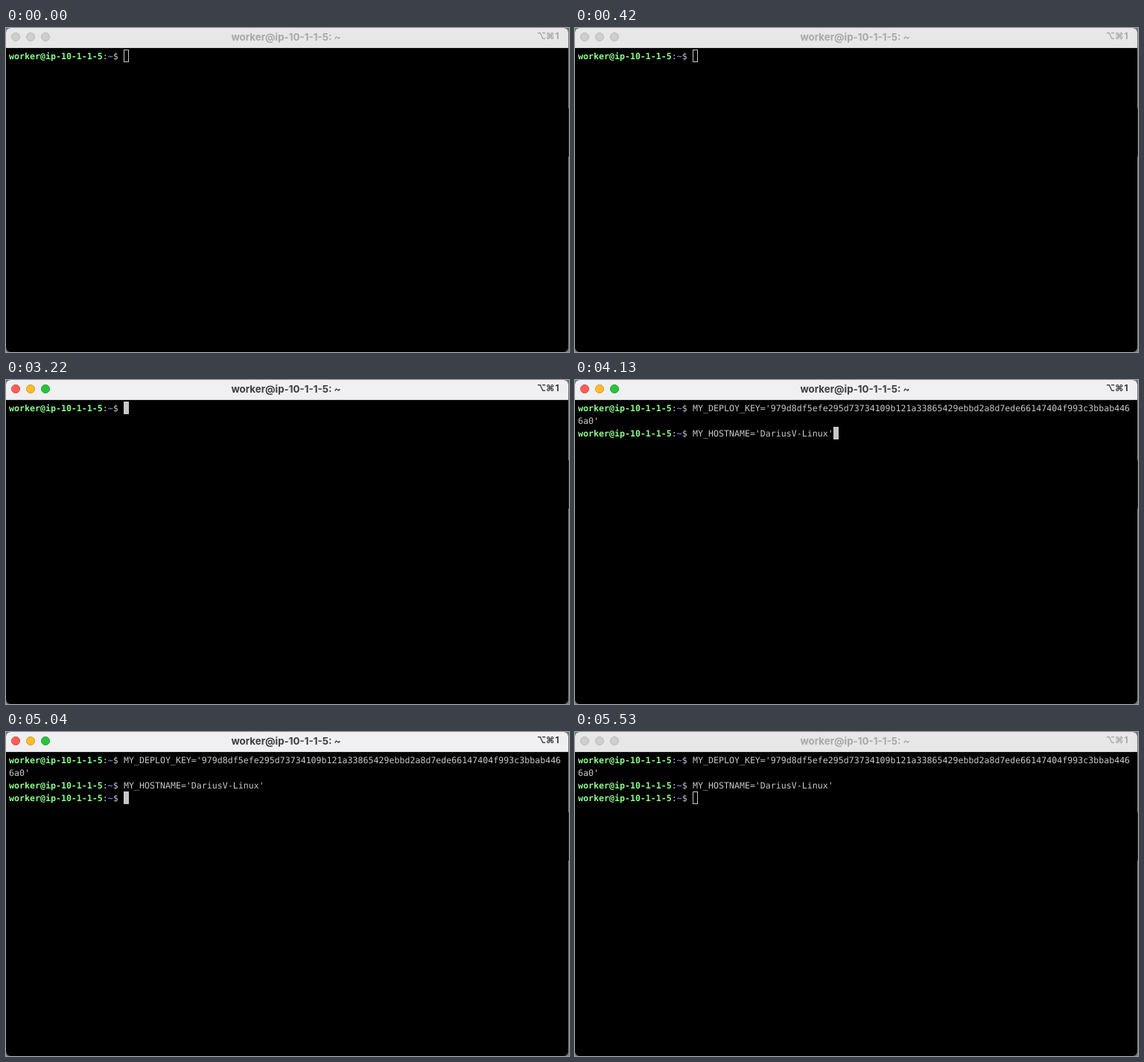
These frames come from a looping animation (756 by 436 pixels, 8 s). An HTML page:

```html
<!DOCTYPE html>
<html lang="en">
<head>
<meta charset="utf-8">
<title>Terminal</title>
<style>
  html, body { margin: 0; width: 100%; height: 100%; overflow: hidden; background: #000; }
  svg { display: block; width: 100%; height: 100%; }

  .bar, .heading, .lit, .cursor, .typed, .next { animation: 8s step-end infinite; }

  .bar { fill: #e7e7e7; animation-name: bar; }
  .heading { fill: #a8a8a8; font: 700 13.3px Inter, sans-serif; animation-name: heading; }
  .off { fill: #cecece; stroke: #b9b9b9; }
  .lit { animation-name: lit; }

  .screen {
    font: 11.628px "DejaVu Sans Mono", monospace;
    text-rendering: geometricPrecision;
    fill: #c7c7c7;
  }
  .user { fill: #8dff8a; font-weight: 700; }
  .path { fill: #7a72e8; font-weight: 700; }
  .typed { animation-name: typed; }
  .next { animation-name: next; }
  .cursor { stroke: #c7c7c7; animation-name: blink, move; }

  /* The window has focus from 3150 to 5530 ms. */
  @keyframes bar { 0%, 69.125% { fill: #e7e7e7 } 39.375% { fill: #f0f0f2 } }
  @keyframes heading { 0%, 69.125% { fill: #a8a8a8 } 39.375% { fill: #3d3d3f } }
  @keyframes lit { 0%, 69.125% { opacity: 0 } 39.375% { opacity: 1 } }
  @keyframes blink { 0%, 69.125% { fill: #000 } 39.375% { fill: #c7c7c7 } }

  /* Pasted at 4130 ms, return at 4970 ms, new prompt at 5040 ms. */
  @keyframes typed { 0% { opacity: 0 } 51.625%, 100% { opacity: 1 } }
  @keyframes next { 0% { opacity: 0 } 63%, 100% { opacity: 1 } }
  @keyframes move {
    0% { transform: translate(158px, 29px) }
    51.625% { transform: translate(347px, 63px) }
    62.125% { transform: translate(4px, 80px) }
    63%, 100% { transform: translate(158px, 80px) }
  }
</style>
</head>
<body>
<svg viewBox="0 0 756 436">
  <defs>
    <clipPath id="frame"><rect width="755" height="436" rx="6"/></clipPath>
    <text id="prompt" x="4" y="42"><tspan class="user">worker@ip-10-1-1-5</tspan>:<tspan class="path">~</tspan>$</text>
    <g id="lights">
      <circle cx="13" cy="12" r="5.5"/>
      <circle cx="33" cy="12" r="5.5"/>
      <circle cx="53" cy="12" r="5.5"/>
    </g>
  </defs>

  <rect width="756" height="436" fill="#727a79"/>
  <rect x="755" y="108" width="1" height="65" fill="#1c1e1e"/>

  <g clip-path="url(#frame)">
    <rect width="755" height="436"/>
    <rect class="bar" width="755" height="27"/>
    <rect y="26" width="755" height="1" fill="#cfcfd0"/>

    <use href="#lights" class="off"/>
    <g class="lit">
      <circle cx="13" cy="12" r="5.5" fill="#fc5f57" stroke="#e2504a"/>
      <circle cx="33" cy="12" r="5.5" fill="#fdbb2f" stroke="#e0a32a"/>
      <circle cx="53" cy="12" r="5.5" fill="#2bc23f" stroke="#25ab36"/>
    </g>

    <g class="heading">
      <text x="376" y="16.5" text-anchor="middle">worker@ip-10-1-1-5: ~</text>
      <text x="713 725 737.5" y="15" font-size="12">⌥⌘1</text>
    </g>

    <g class="screen">
      <use href="#prompt"/>
      <g class="typed">
        <text x="158" y="42">MY_DEPLOY_KEY='979d8df5efe295d73734109b121a33865429ebbd2a8d7ede66147404f993c3bbab446</text>
        <text x="4" y="59">6a0'</text>
        <use href="#prompt" y="34"/>
        <text x="158" y="76">MY_HOSTNAME='DariusV-Linux'</text>
      </g>
      <use href="#prompt" y="51" class="next"/>
      <rect class="cursor" x=".5" y=".5" width="6" height="16"/>
    </g>
  </g>
</svg>
</body>
</html>
```
